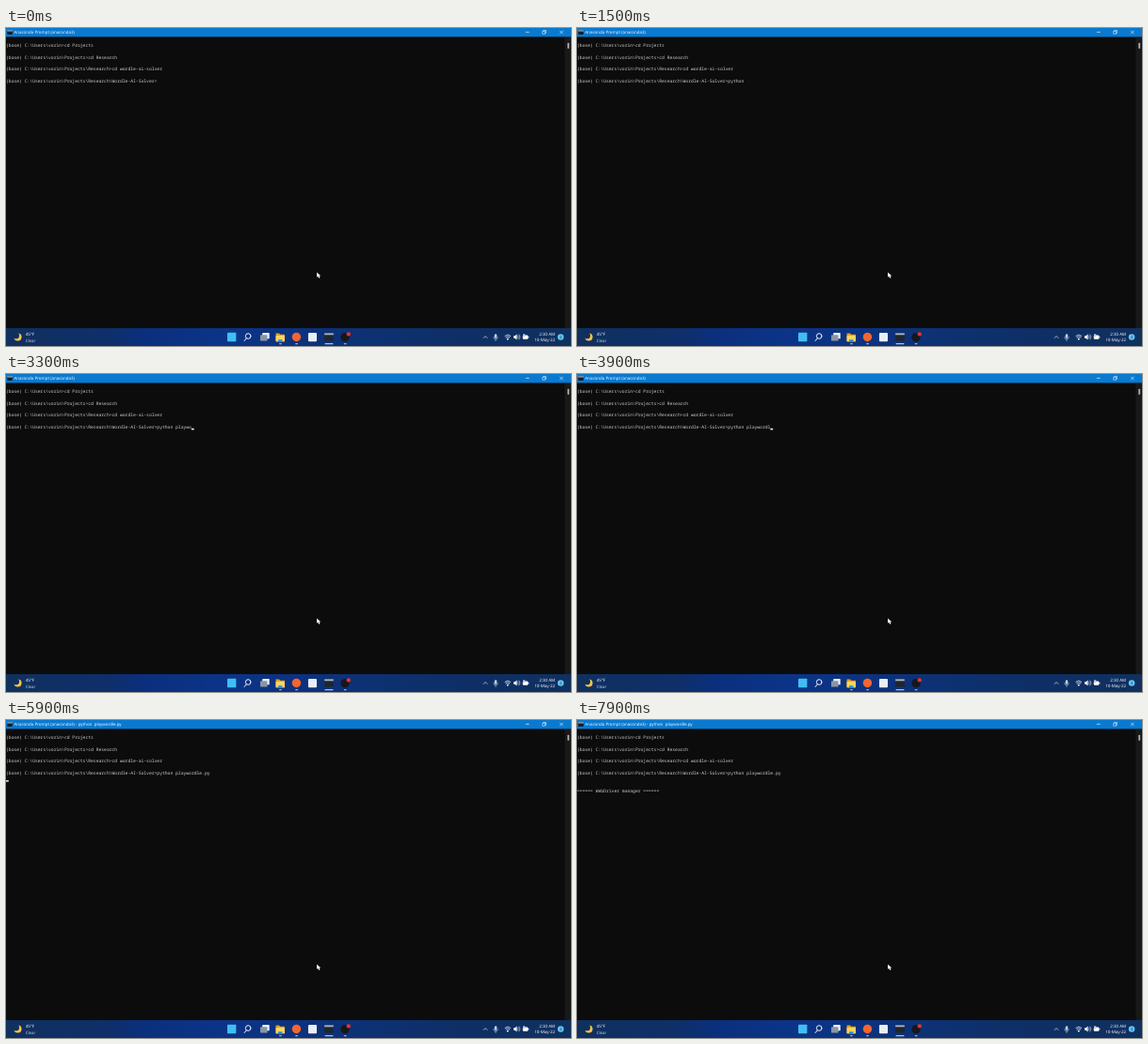
Recreate the animation shown at these times as an HTML page with a canvas. Size 600 px wide and 338 px high, loop 8 s.

```html
<!DOCTYPE html>
<html lang="en">
<head>
<meta charset="utf-8">
<title>Terminal session</title>
<style>
  html, body { margin: 0; width: 100%; height: 100%; overflow: hidden; background: #0c0c0c; }
  canvas { display: block; }
</style>
</head>
<body>
<canvas id="stage" width="600" height="338"></canvas>
<script>
const ctx = document.getElementById('stage').getContext('2d');
const LOOP = 8000, CELL = 9, ROW = 20, TOP = 30;   // desktop units: 1920 x 1080
const UI = '"Open Sans", "Noto Sans", sans-serif';
const MONO = '15px "Noto Sans Mono", "DejaVu Sans Mono", monospace';

const COMMAND = 'python playwordle.py';
const HOME = '(base) C:\\Users\\vorin';
const PROMPT = HOME + '\\Projects\\Research\\Wordle-AI-Solver>';
const HISTORY = [
  HOME + '>cd Projects',
  HOME + '\\Projects>cd Research',
  HOME + '\\Projects\\Research>cd wordle-ai-solver'
];
const ENTER = 5900, OUTPUT = 6200;

// Moments at which each character of the command appears
const KEYS = [200, 300, 500, 700, 900, 1000, 1200, 1600, 1700, 1900,
              2400, 3100, 3300, 3700, 3800, 3900, 4000, 5100, 5600, 5700];
// Spans in which the text cursor is lit
const LIT = [[100, 1500], [1600, 2100], [2200, 2500], [3000, 3500], [3700, 4100],
             [4700, 5000], [5100, 5300], [5600, 6300], [7300, 7800]];

function rect(x, y, w, h, color) {
  ctx.fillStyle = color;
  ctx.fillRect(x, y, w, h);
}

function box(x, y, w, h, r, color) {
  ctx.fillStyle = color;
  ctx.beginPath();
  ctx.roundRect(x, y, w, h, r);
  ctx.fill();
}

function disc(x, y, r, color) {
  ctx.fillStyle = color;
  ctx.beginPath();
  ctx.arc(x, y, r, 0, 7);
  ctx.fill();
}

function stroke(path, color = '#fff', width = 2) {
  ctx.strokeStyle = color;
  ctx.lineWidth = width;
  ctx.stroke(new Path2D(path));
}

function shape(path, color) {
  ctx.fillStyle = color;
  ctx.fill(new Path2D(path));
}

function label(text, x, y, align = 'left', font = '14.3px ' + UI, color = '#fff') {
  ctx.font = font;
  ctx.textAlign = align;
  ctx.fillStyle = color;
  ctx.fillText(text, x, y);
}

function line(text, row) {
  label(text, 0, TOP + row * ROW + 15, 'left', MONO, '#d0d0d0');
}

function titleBar(running) {
  rect(0, 0, 1920, TOP, '#0a7ad0');
  box(4, 8, 18, 14, 2, '#15202b');
  rect(4, 8, 18, 3, '#c8d4dc');
  label('Anaconda Prompt (anaconda3)' + (running ? ' - python  playwordle.py' : ''), 27, 20);
  stroke('M1766 14h12');
  stroke('M1823 11h9v9h-9zM1826 11v-3h9v9h-3', '#fff', 1.6);
  stroke('M1882 9l11 11m0-11l-11 11', '#fff', 1.8);
}

function terminal(t) {
  rect(0, TOP, 1920, 992, '#0c0c0c');
  rect(1899, TOP, 21, 992, '#191919');
  box(1908, 50, 6, 20, 3, '#a8a8a8');

  HISTORY.forEach((text, i) => line(text, 1 + 2 * i));
  const typed = KEYS.filter(k => k <= t).length;
  line(PROMPT + COMMAND.slice(0, typed), 7);
  if (t >= OUTPUT) line('====== WebDriver manager ======', 10);

  if (LIT.some(([on, off]) => t >= on && t < off)) {
    const space = t >= 1300 && typed === 6 ? 0 : 0;
    const col = t < ENTER ? PROMPT.length + typed + space : 0;
    const row = t < ENTER ? 7 : t < OUTPUT ? 8 : 11;
    rect(col * CELL, TOP + row * ROW + 15, CELL, 5, '#f2f2f2');
  }
}

function taskbar() {
  const g = ctx.createLinearGradient(0, 0, 1920, 0);
  [[0, '#10305f'], [.18, '#0e2f69'], [.24, '#0b2f7c'], [.38, '#0b3488'],
   [.5, '#0c3280'], [.65, '#0d3172'], [.8, '#0e2f66'], [1, '#10305f']]
    .forEach(stop => g.addColorStop(...stop));
  rect(0, 1021, 1920, 61, g);

  // Weather
  disc(40, 1051, 13, '#f6c344');
  disc(34, 1046, 11, '#10305f');
  label('45°F', 66, 1046);
  label('Clear', 66, 1068, 'left', '14px ' + UI, '#d4dcea');

  // Pinned apps
  box(752, 1036, 30, 30, 2, '#42bdf3');
  ctx.lineCap = 'round';
  stroke('M832 1048a9 9 0 1 0-18 0a9 9 0 1 0 18 0M817 1055l-7 9', '#f2f5fa', 3.2);
  ctx.lineCap = 'butt';
  box(871, 1037, 24, 20, 2, '#f0f2f5');
  box(864, 1044, 24, 20, 2, '#8b95a3');
  shape('M917 1038h11l4 4h15v24h-30z', '#e5a421');
  box(917, 1046, 30, 20, 2, '#ffd45e');
  rect(925, 1060, 14, 6, '#2b8ad6');
  disc(987, 1051, 15, '#f4652f');
  box(1027, 1037, 29, 29, 3, '#e9eef4');
  box(1082, 1038, 31, 26, 2, '#20262d');
  rect(1082, 1038, 31, 6, '#a9b3bd');
  disc(1152, 1052, 15, '#16171c');
  disc(1164, 1041, 7, '#e0342f');

  [932, 987, 1152].forEach(x => box(x - 4, 1072, 9, 4, 2, '#a5b0c4'));
  box(1083, 1072, 29, 4, 2, '#9bc8ee');

  // Tray
  stroke('M1622 1055l7-7l7 7');
  box(1660, 1041, 8, 14, 4, '#c5d0e0');
  stroke('M1657 1050q0 9 7 9t7-9M1664 1059v6', '#c5d0e0');
  stroke('M1695 1048q10-9 20 0M1698 1053q7-6 14 0', '#fff', 2.5);
  shape('M1705 1062l-4-5q4-3 8 0z', '#fff');
  shape('M1725 1047h5l6-6v20l-6-6h-5z', '#fff');
  stroke('M1739 1046q4 5 0 10M1743 1042q7 9 0 18', '#fff', 1.8);
  box(1756, 1045, 18, 13, 3, '#fff');
  rect(1774, 1049, 3, 5, '#fff');
  shape('M1757 1041h7v9h-7z', '#c5d0e0');
  label('2:30 AM', 1866, 1046, 'right');
  label('10-May-22', 1866, 1067, 'right');
  disc(1885, 1051, 10.5, '#62c3f5');
  label('4', 1885, 1056, 'center', '13px ' + UI, '#10305f');
}

function pointer() {
  const arrow = 'M1056 831v17l4-4l3 7l4-2l-3-6h6z';
  stroke(arrow, '#000', 2);
  shape(arrow, '#fff');
}

function draw(now) {
  const t = now % LOOP;
  ctx.setTransform(.3125, 0, 0, .3125, 0, 0);
  ctx.textRendering = 'geometricPrecision';
  terminal(t);
  titleBar(t >= ENTER);
  taskbar();
  pointer();
  requestAnimationFrame(draw);
}

requestAnimationFrame(draw);
</script>
</body>
</html>
```
